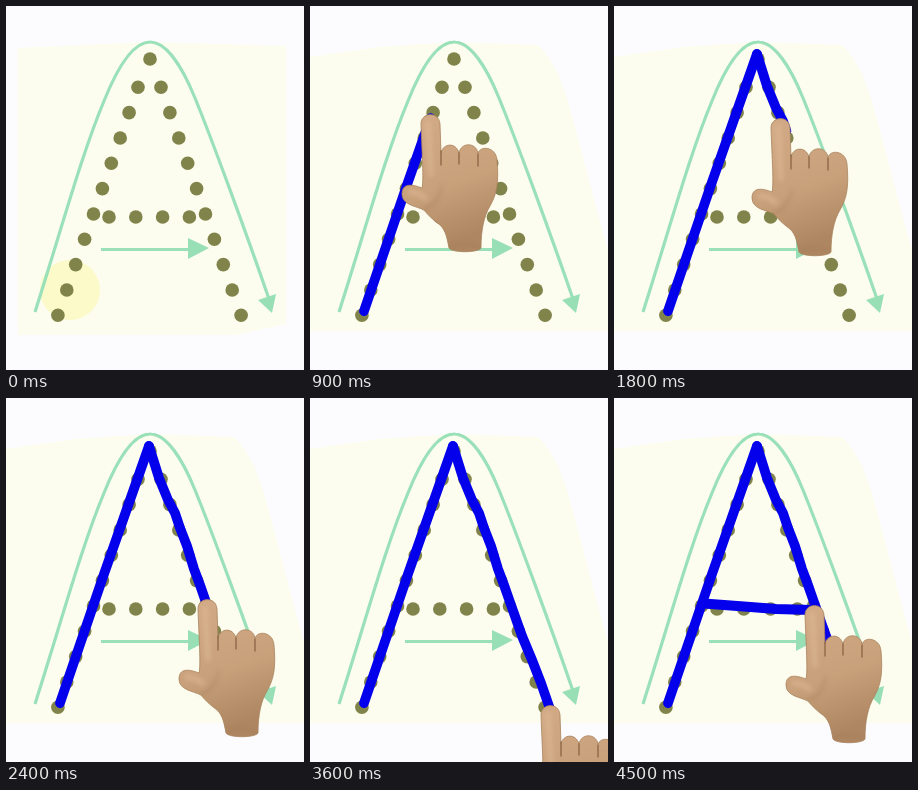
Recreate the animation shown at these times as an HTML page. Size 298 px wide and 364 px high, loop 4.8 s.

```html
<!DOCTYPE html>
<html lang="en">
<head>
<meta charset="utf-8">
<title>Tracing the letter A</title>
<style>
  html, body { margin: 0; height: 100%; overflow: hidden; background: #fcfcff; }
  svg { display: block; width: 100%; height: 100%; }
  .guide { fill: none; stroke: #9ae0b9; stroke-width: 3.2; }
  .head { fill: #98dfb6; }
  .ink { fill: none; stroke: #0400ec; stroke-width: 9.8; stroke-linecap: round; stroke-linejoin: round; }
  .crease { fill: none; stroke: #8f6a49; stroke-width: 1.4; stroke-linecap: round; }
  .shine { fill: none; stroke: #e0bd9a; stroke-width: 6; stroke-linecap: round; opacity: .5; }
</style>
</head>
<body>
<svg viewBox="0 0 298 364">
  <defs>
    <linearGradient id="skin" x1="0" y1="0" x2=".25" y2="1">
      <stop offset="0" stop-color="#d3ab87"/>
      <stop offset=".6" stop-color="#c8a07a"/>
      <stop offset="1" stop-color="#ae8661"/>
    </linearGradient>
    <filter id="soft" x="-50%" y="-50%" width="200%" height="200%">
      <feGaussianBlur stdDeviation="2"/>
    </filter>
  </defs>
  <path id="tint" fill="#fdfdef"/>
  <circle id="start" cx="64" cy="284" r="30" fill="#fcfac9"/>
  <path class="guide" d="M29 306C55 225 75 150 98 95C112 60 127 36 144 36C160 36 176 60 189 92C205 131 241 229 263 293"/>
  <path class="head" d="M252 294L270 288L266 307Z"/>
  <path class="guide" d="M95 243.5H184"/>
  <path class="head" d="M182 232L203 242L182 253Z"/>
  <g id="dots" fill="#80834a"></g>
  <path class="ink" d="M54 305L98 176L143 48"/>
  <path class="ink" d="M143 48L153 80L162 102L169 115L174 130L181 148L188 171L194 187L201 207L212 238L222 262L231 285L240 311"/>
  <path class="ink" d="M90 205.5L130 208.5L162 211L198 212"/>
  <g id="hand">
    <path fill="url(#skin)" stroke="#a9835f" stroke-width=".8" d="M-9 10C-9 -2 9 -3 10 10L11 39C13 29 26 28 29 39C31 28 46 28 48 39C51 31 66 33 67 46C69 68 67 80 60 92C54 102 51 116 51 134C48 139 22 139 19 134C17 124 16 117 10 111C3 106 -2 101 -6 96C-14 92 -28 91 -28 80C-28 69 -18 70 -8 74C-6 66 -8 40 -9 10Z"/>
    <g filter="url(#soft)">
      <path class="shine" d="M-2 10L1 60M-20 78Q-12 78 -5 84"/>
      <path class="crease" opacity=".45" d="M-7 95C4 94 9 84 12 72M21 133Q35 128 49 133"/>
    </g>
    <path class="crease" d="M11 37V51M29 39V50M48 40V52"/>
  </g>
</svg>
<script>
const FRAME = 300, FRAMES = 16;
const byId = id => document.getElementById(id);
const inks = [...document.querySelectorAll('.ink')];

// Top of the fingertip at each step; the first step has no hand.
const tips = [
  null, [75, 237], [98, 172], [120, 108], [141, 45],
  [151, 76], [166, 112], [183, 154], [201, 201], [218, 242],
  [235, 282], [239, 303], [240, 307], [133, 200], [168, 210], [200, 207]
];
// Drawn share of each stroke as [step, share] keys.
const progress = [
  [[0, 0], [4, 1]],
  [[4, 0], [8, .59], [10, .9], [11, .98], [12, 1]],
  [[12, 0], [13, .38], [15, 1]]
];

function interpolate(keys, step) {
  const next = keys.findIndex(key => key[0] >= step);
  if (next < 0) return 1;
  if (next === 0) return 0;
  const [a, from] = keys[next - 1], [b, to] = keys[next];
  return from + (to - from) * (step - a) / (b - a);
}

function addDot(x, y) {
  const dot = document.createElementNS('http://www.w3.org/2000/svg', 'circle');
  dot.setAttribute('cx', x);
  dot.setAttribute('cy', y);
  dot.setAttribute('r', 6.8);
  byId('dots').append(dot);
}
addDot(144, 53);
for (let i = 0; i < 10; i++) {
  const y = 81.3 + 25.33 * i;
  addDot(132 - 8.9 * i, y);
  addDot(155 + 8.9 * i, y);
}
for (let i = 0; i < 4; i++) addDot(103 + 26.8 * i, 211);

function draw(step) {
  const tip = tips[step];
  byId('start').style.display = tip ? 'none' : '';
  byId('hand').style.display = tip ? '' : 'none';
  if (tip) byId('hand').setAttribute('transform', `translate(${tip})`);
  byId('tint').setAttribute('d', tip
    ? 'M0 51L70 41L144 36L228 39Q250 60 262 110L298 245V325H0Z'
    : 'M12 42L144 36L280 40V318L230 329H12Z');
  inks.forEach((ink, i) => {
    const share = interpolate(progress[i], step);
    const length = ink.getTotalLength();
    ink.style.display = share ? '' : 'none';
    ink.style.strokeDasharray = `${share * length} ${length + 20}`;
  });
}

function tick() {
  draw(Math.floor(performance.now() / FRAME) % FRAMES);
  requestAnimationFrame(tick);
}
tick();
</script>
</body>
</html>
```
